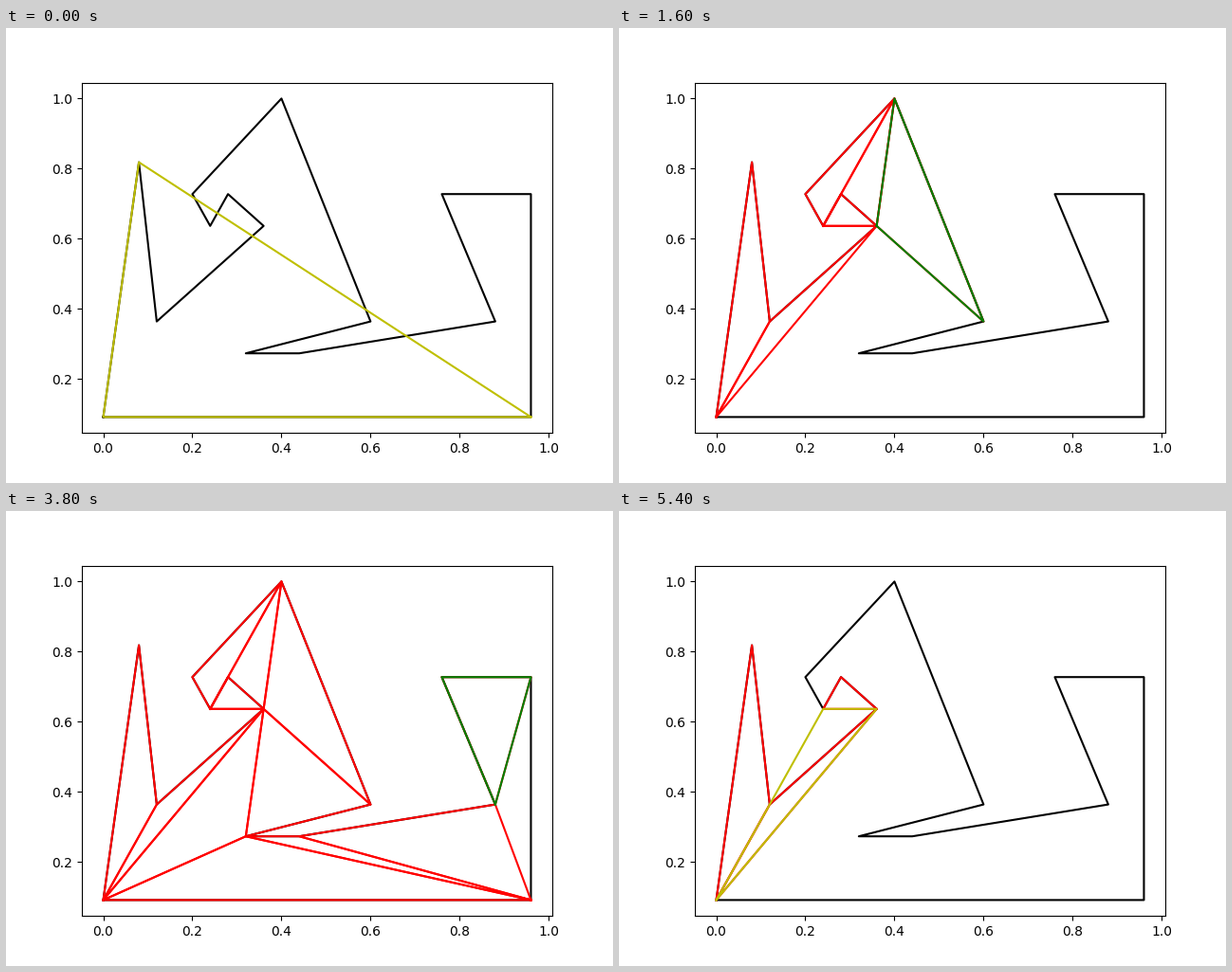
These frames come from a looping animation (640x480 px, 5.6 s). A matplotlib script:

```python
import numpy as np
import matplotlib.pyplot as plt
from matplotlib.animation import FuncAnimation

# Corners of the polygon on a grid of 25 x 11 cells
CORNERS = np.array([(0, 1), (2, 9), (3, 4), (9, 7), (7, 8),
                    (6, 7), (5, 8), (10, 11), (15, 4), (8, 3),
                    (11, 3), (22, 4), (19, 8), (24, 8), (24, 1)])
GRID = (25, 11)
WHOLE = list(range(len(CORNERS)))


def edges(ring):
    pts = CORNERS[ring]
    return zip(pts, np.roll(pts, -1, axis=0))


def is_inside(point, ring):
    """Ray casting to the right; edges that only touch the ray do not count."""
    x, y = point
    hits = 0
    for (x1, y1), (x2, y2) in edges(ring):
        if min(y1, y2) < y < max(y1, y2):
            hits += x1 + (y - y1) * (x2 - x1) / (y2 - y1) >= x
    return hits % 2 == 1


def covers(tri, point):
    x, y = point
    sides = [(x2 - x1) * (y - y1) - (y2 - y1) * (x - x1)
             for (x1, y1), (x2, y2) in edges(tri)]
    return min(sides) > 0 or max(sides) < 0


def is_ear(tri, ring):
    cut_middle = (CORNERS[tri[0]] + CORNERS[tri[2]]) / 2
    return (is_inside(cut_middle, WHOLE) and is_inside(cut_middle, ring)
            and not any(covers(tri, CORNERS[v]) for v in ring))


def clip_ears():
    """Yield (cut triangles, tested triangle, test result) for each test."""
    ring, cut = list(WHOLE), []
    while len(ring) > 2:
        for i, tip in enumerate(ring):
            tri = [ring[i - 1], tip, ring[(i + 1) % len(ring)]]
            found = is_ear(tri, ring)
            if found:
                cut.append(tri)
            yield list(cut), tri, found
            if found:
                ring.remove(tip)
                break
        else:
            return


def closed(ring):
    return (CORNERS[ring + ring[:1]] / GRID).T


tests = list(clip_ears())
# The steps play in the alphabetical order of their numbers: 1, 10, 11, ...
order = sorted(range(1, len(tests) + 1), key=str)

fig, ax = plt.subplots(figsize=(6.4, 4.8), dpi=100)
ax.plot(*closed(WHOLE), "k")
cut_lines = [ax.plot([], [], "r")[0] for _ in WHOLE[2:]]
probe, = ax.plot([], [], "y")


def update(frame):
    cut, tri, found = tests[order[frame] - 1]
    for k, line in enumerate(cut_lines):
        line.set_visible(k < len(cut))
        if k < len(cut):
            line.set_data(*closed(cut[k]))
    probe.set_data(*closed(tri))
    probe.set_color("g" if found else "y")
    return [*cut_lines, probe]


anim = FuncAnimation(fig, update, frames=len(tests), interval=200,
                     repeat=True, repeat_delay=0)
plt.show()
```
